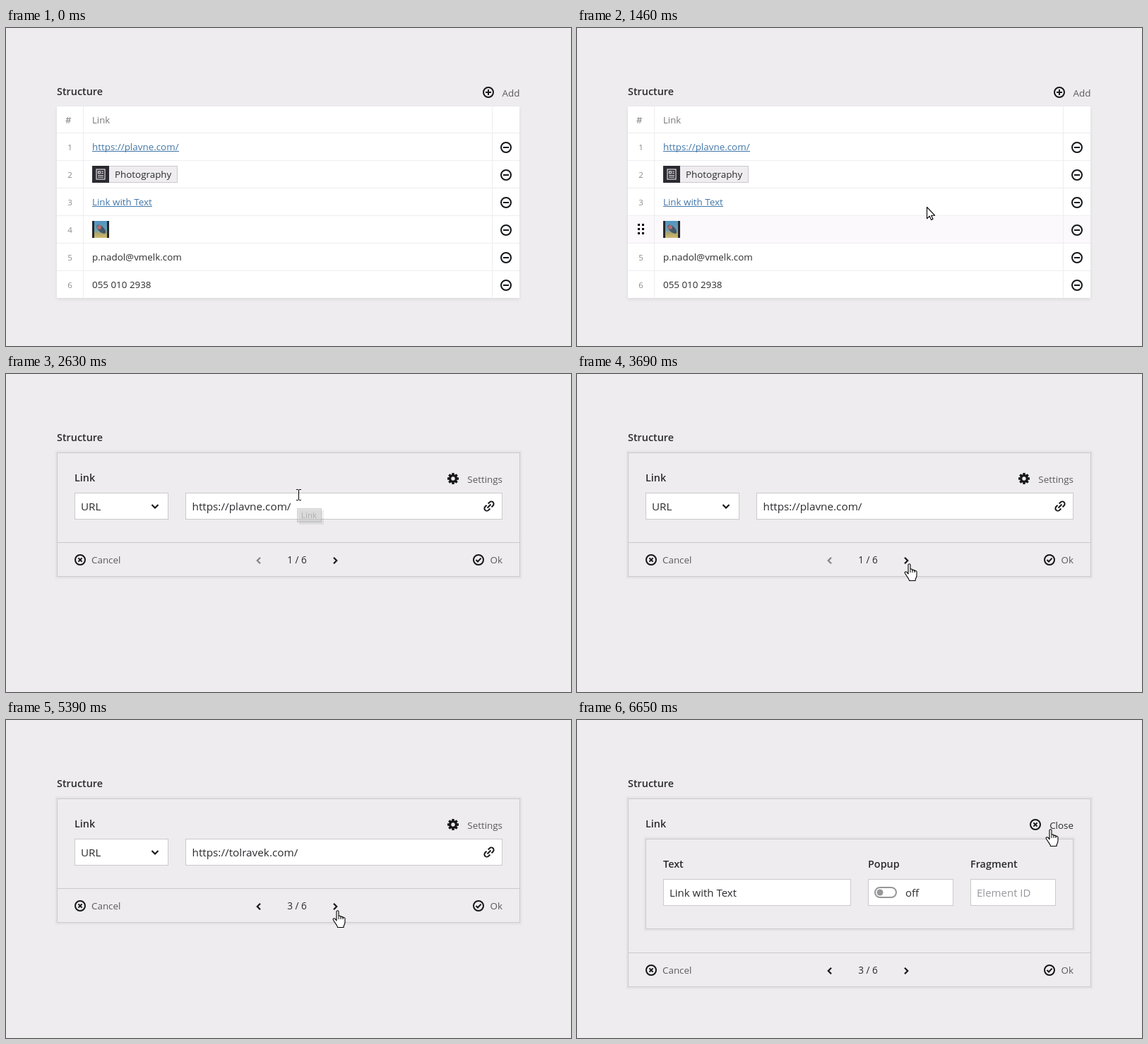
Write an HTML page with a canvas that moves like this. It is 800 by 450 pixels and loops after 8000 ms.

```html
<!DOCTYPE html>
<html lang="en">
<head>
<meta charset="utf-8">
<title>Structure field</title>
<style>
html, body { margin: 0; width: 100%; height: 100%; overflow: hidden; background: #eeecef; }
canvas { display: block; width: 800px; height: 450px; }
</style>
</head>
<body>
<canvas id="stage" width="800" height="450"></canvas>
<script>
const ctx = document.getElementById('stage').getContext('2d');
const LOOP = 8000;
const BG = '#eeecef', LINE = '#eeecef', BORDER = '#cbc9cc';
const INK = '#16171a', TEXT = '#2b2b2e', SOFT = '#5b5a5e', MUTED = '#77767a', BLUE = '#4276a8';
const SITE = 'https://plavne.com/';
const OPEN = 2630, SECOND = 4190, THIRD = 5390, SETTINGS = 6650;

// Pointer hotspot: time, x, y
const PATH = [
  [1000, 553, 482], [1060, 551, 448], [1460, 495, 253], [1860, 418, 176], [2000, 412, 170],
  [3260, 412, 170], [3690, 469, 269], [3829, 469, 269], [3830, 468, 270],
  [5690, 468, 270], [6390, 669, 155], [LOOP, 669, 155]
];

const clamp = v => Math.max(0, Math.min(1, v));

function slope(i, k) {
  const a = PATH[Math.max(0, i - 1)], b = PATH[i], c = PATH[Math.min(PATH.length - 1, i + 1)];
  return (b[k] - a[k]) * (c[k] - b[k]) <= 0 ? 0 : (c[k] - a[k]) / (c[0] - a[0]);
}

function pointerAt(t) {
  t = Math.max(t, PATH[0][0]);
  let i = 0;
  while (i < PATH.length - 2 && t >= PATH[i + 1][0]) i++;
  const a = PATH[i], b = PATH[i + 1], d = b[0] - a[0], u = clamp((t - a[0]) / d);
  const axis = k => {
    const s = u * u * (3 - 2 * u);
    return a[k] + (b[k] - a[k]) * s
      + d * u * (1 - u) * ((1 - u) * slope(i, k) - u * slope(i + 1, k));
  };
  return { x: axis(1), y: axis(2) };
}

const inside = (p, x0, y0, x1, y1) => p.x >= x0 && p.x < x1 && p.y >= y0 && p.y < y1;

function rect(x, y, w, h, color) {
  ctx.fillStyle = color;
  ctx.fillRect(x, y, w, h);
}

function box(x, y, w, h, fill = '#fff', edge = BORDER) {
  rect(x, y, w, h, edge);
  rect(x + 1, y + 1, w - 2, h - 2, fill);
}

function panel(x, y, w, h) {
  rect(x - 2.5, y - 2.5, w + 5, h + 5, '#e5e3e6');
  box(x, y, w, h, BG);
}

function label(str, x, y, size = 13.4, color = TEXT, align = 'left', weight = 400) {
  ctx.font = `${weight} ${size}px "Open Sans", "Noto Sans", sans-serif`;
  ctx.textAlign = align;
  ctx.fillStyle = color;
  ctx.fillText(str, x, y);
}

const heading = (str, x, y) => label(str, x, y, 14.4, TEXT, 'left', 600);

function link(str, x, y) {
  label(str, x, y, 13.4, BLUE);
  rect(x, y + 1, Math.round(ctx.measureText(str).width), 1, BLUE);
}

function stroke(points, color = INK, width = 2) {
  ctx.strokeStyle = color;
  ctx.lineWidth = width;
  ctx.beginPath();
  points.forEach(([x, y]) => ctx.lineTo(x, y));
  ctx.stroke();
}

function disc(x, y, r, color) {
  ctx.fillStyle = color;
  ctx.beginPath();
  ctx.arc(x, y, r, 0, 7);
  ctx.fill();
}

function ringIcon(x, y, mark) {
  ctx.strokeStyle = INK;
  ctx.lineWidth = 2;
  ctx.beginPath();
  ctx.arc(x, y, 7, 0, 7);
  ctx.stroke();
  if (mark === 'check') return stroke([[x - 3.5, y], [x - 1, y + 2.5], [x + 3.6, y - 2.4]]);
  if (mark === 'cross') {
    stroke([[x - 2.6, y - 2.6], [x + 2.6, y + 2.6]]);
    return stroke([[x - 2.6, y + 2.6], [x + 2.6, y - 2.6]]);
  }
  rect(x - 4, y - 1, 8, 2, INK);
  if (mark === 'plus') rect(x - 1, y - 4, 2, 8, INK);
}

function gear(x, y) {
  ctx.save();
  ctx.translate(x, y);
  ctx.strokeStyle = INK;
  ctx.lineWidth = 3.4;
  ctx.beginPath();
  ctx.arc(0, 0, 4.4, 0, 7);
  ctx.stroke();
  for (let i = 0; i < 8; i++) {
    rect(-1.7, -8, 3.4, 3.5, INK);
    ctx.rotate(Math.PI / 4);
  }
  ctx.restore();
}

function chain(x, y) {
  ctx.save();
  ctx.translate(x, y);
  ctx.rotate(-Math.PI / 4);
  ctx.strokeStyle = INK;
  ctx.lineWidth = 2;
  for (const s of [0, 1]) {
    ctx.rotate(s * Math.PI);
    ctx.beginPath();
    ctx.moveTo(-1.5, 3.4);
    ctx.lineTo(-4.5, 3.4);
    ctx.arc(-4.5, 0, 3.4, Math.PI / 2, Math.PI * 1.5);
    ctx.lineTo(-1.5, -3.4);
    ctx.stroke();
  }
  stroke([[-3.5, 0], [3.5, 0]]);
  ctx.restore();
}

function pageIcon(x, y, size) {
  rect(x, y, size, size, '#2b2a31');
  ctx.save();
  ctx.translate(x + size / 2, y + size / 2);
  ctx.strokeStyle = '#d5d3d8';
  ctx.lineWidth = 1.3;
  ctx.strokeRect(-6, -7, 12, 14);
  ctx.strokeRect(-3.5, -4.2, 3, 3);
  for (const [lx, ly, w] of [[1, -4.5, 3], [1, -2, 3], [-4, 1, 8], [-4, 3.5, 8]]) rect(lx, ly, w, 1.2, '#d5d3d8');
  ctx.restore();
}

function photo(x, y) {
  const sky = ctx.createLinearGradient(0, y, 0, y + 24);
  sky.addColorStop(0, '#4f93c4');
  sky.addColorStop(.55, '#6fa0b0');
  sky.addColorStop(.75, '#b5a768');
  sky.addColorStop(1, '#cdbb74');
  rect(x, y, 24, 24, sky);
  ctx.save();
  ctx.translate(x + 12, y + 11);
  ctx.rotate(.75);
  ctx.fillStyle = '#44586a';
  ctx.beginPath();
  ctx.ellipse(1, 0, 8, 4, 0, 0, 7);
  ctx.fill();
  ctx.restore();
  disc(x + 10, y + 9, 3, '#b56a70');
  rect(x, y, 3, 24, '#26262c');
  rect(x + 21, y, 3, 24, '#26262c');
}

function chevron(x, y, dx, dy, color = INK) {
  const w = 4.2;
  stroke(dy ? [[x - w - .3, y - 2], [x, y + 2.5], [x + w + .3, y - 2]]
            : [[x - dx * 2, y - w], [x + dx * 2.2, y], [x - dx * 2, y + w]], color, 2.2);
}

function table(hoverRow) {
  ctx.save();
  ctx.shadowColor = 'rgba(22,23,26,.09)';
  ctx.shadowBlur = 5;
  ctx.shadowOffsetY = 2;
  rect(72, 111, 655, 271, '#fff');
  ctx.restore();
  ringIcon(683, 91, 'plus');
  label('Add', 727.5, 97, 13.4, SOFT, 'right');
  label('#', 84, 135, 13.2, MUTED);
  label('Link', 122, 135, 13.2, MUTED);
  for (let i = 0; i < 6; i++) {
    const y = 148 + i * 39;
    if (i === hoverRow) {
      rect(72, y + 1, 655, 38, '#fbf9fc');
      for (let k = 0; k < 6; k++) rect(86 + k % 2 * 6, y + 12 + (k >> 1) * 6, 3, 3, '#000');
    } else {
      label(i + 1, 90.5, y + 25, 11.6, '#8b8a8e', 'center');
    }
    rect(72, y, 655, 1, LINE);
    ringIcon(708, y + 21, 'minus');
  }
  rect(109, 111, 1, 271, LINE);
  rect(688, 111, 1, 271, LINE);
  link(SITE, 122, 173);
  box(122, 195, 121, 24, '#efedf0');
  pageIcon(122, 195, 24);
  label('Photography', 154, 212);
  link('Link with Text', 122, 251);
  photo(122, 273);
  label('p.nadol@vmelk.com', 122, 329);
  label('055 010 2938', 122, 368);
}

function footer(y, index) {
  rect(73, y - 25, 654, 1, BORDER);
  ringIcon(105, y, 'cross');
  label('Cancel', 121, y + 5, 13.4, SOFT);
  chevron(358, y + 1, -1, 0, index > 1 ? INK : '#858488');
  label(`${index} / 6`, 412, y + 5, 13.6, TEXT, 'center');
  chevron(466, y + 1, 1, 0);
  ringIcon(669, y, 'check');
  label('Ok', 703, y + 5, 13.4, SOFT, 'right');
}

function editor(index, hover) {
  panel(72, 111, 656, 176);
  heading('Link', 97, 152);
  gear(633, 148);
  label('Settings', 703, 154, 13.4, hover ? INK : SOFT, 'right');
  box(97, 168, 133, 38);
  label(index === 2 ? 'Page' : 'URL', 106, 193, 15.2);
  chevron(211, 187, 0, 1);
  if (index === 2) {
    box(254, 168, 449, 38, '#fff', '#e2e0e3');
    pageIcon(254, 168, 38);
    label('Photography', 303, 192);
    ringIcon(684, 187, 'minus');
  } else {
    box(254, 168, 449, 38);
    label(index === 1 ? SITE : 'https://tolravek.com/', 263.5, 193, 15.3);
    chain(684, 187);
  }
  footer(263, index);
}

function settings() {
  panel(72, 111, 656, 267);
  heading('Link', 97, 152);
  ringIcon(649, 148, 'cross');
  label('Close', 703, 154, 13.4, TEXT, 'right');
  panel(97, 168, 606, 128);
  [['Text', 122, 266], ['Popup', 412, 121], ['Fragment', 557, 121]].forEach(([name, x, w]) => {
    heading(name, x, 209);
    box(x, 225, w, 38);
  });
  label('Link with Text', 131, 250, 15);
  ctx.strokeStyle = '#979699';
  ctx.lineWidth = 2;
  ctx.beginPath();
  ctx.roundRect(422, 237, 30, 14, 7);
  ctx.stroke();
  disc(429, 244, 4.5, '#979699');
  label('off', 465, 250, 15);
  label('Element ID', 566, 250, 15, '#98979b');
  footer(354, 3);
}

function tooltip(str, x, y, w, alpha) {
  if (alpha <= 0) return;
  ctx.save();
  ctx.globalAlpha = alpha;
  rect(x + 3, y + 3, w, 20, 'rgba(0,0,0,.2)');
  box(x, y, w, 20, '#fff', '#767676');
  label(str, x + 6, y + 14, 11.5, '#575757');
  ctx.restore();
}

const ARROW = 'M.5 .5V16.8L4.2 13.2L6.6 18.6L9 17.5L6.7 12.2H11.6Z';
const HAND = 'M0 1C0-.6 3-.6 3 1V8C3 6.6 6 6.8 6 8.4V9C6.2 7.7 9 8 9 9.5V10C9.4 9 12 9.4 12 11V16C12 19 10 20 10 23.5H1.5C1.5 21-1.4 18.5-3 15.5L-4.8 12.8C-5.4 11.2-3.4 10-2 11.4L0 13.8Z';
const SHAPES = { arrow: new Path2D(ARROW), hand: new Path2D(HAND) };

function pointer({ x, y }, kind) {
  ctx.save();
  ctx.translate(Math.round(x), Math.round(y));
  if (kind === 'text') {
    rect(2, -6, 1, 14, '#000');
    for (const top of [-7, 8]) {
      rect(-1, top, 3, 1, '#000');
      rect(3, top, 3, 1, '#000');
    }
  } else {
    ctx.lineWidth = 1.1;
    ctx.lineJoin = 'round';
    ctx.strokeStyle = '#000';
    ctx.fillStyle = '#fff';
    ctx.fill(SHAPES[kind]);
    ctx.stroke(SHAPES[kind]);
    if (kind === 'hand') for (const lx of [3, 6, 9]) stroke([[lx, 8.5], [lx, 12]], '#000', 1);
  }
  ctx.restore();
}

function draw(t) {
  rect(0, 0, 800, 450, BG);
  heading('Structure', 72, 95);
  const probe = pointerAt(t - 45); // hover reacts slightly late
  let kind = 'arrow';
  if (t < OPEN) {
    const row = Math.floor((probe.y - 148) / 39);
    table(t >= 1060 && row < 6 ? row : -1);
  } else if (t < SETTINGS) {
    const onSettings = inside(probe, 625, 138, 703, 161);
    editor(t < SECOND ? 1 : t < THIRD ? 2 : 3, onSettings);
    if (onSettings || inside(probe, 450, 246, 482, 282)) kind = 'hand';
    else if (inside(probe, 254, 168, 703, 206)) kind = 'text';
  } else {
    settings();
    kind = 'hand';
  }
  tooltip('Link', 412, 190, 35, Math.min(clamp((t - 2130) / 130), clamp((2730 - t) / 300)));
  tooltip('Next', 469, 295, 38, Math.min(clamp((t - 4030) / 130), clamp((4360 - t) / 170)));
  if (t >= 1060) pointer(pointerAt(t), kind);
}

function tick() {
  draw(performance.now() % LOOP);
  requestAnimationFrame(tick);
}
tick();
</script>
</body>
</html>
```
